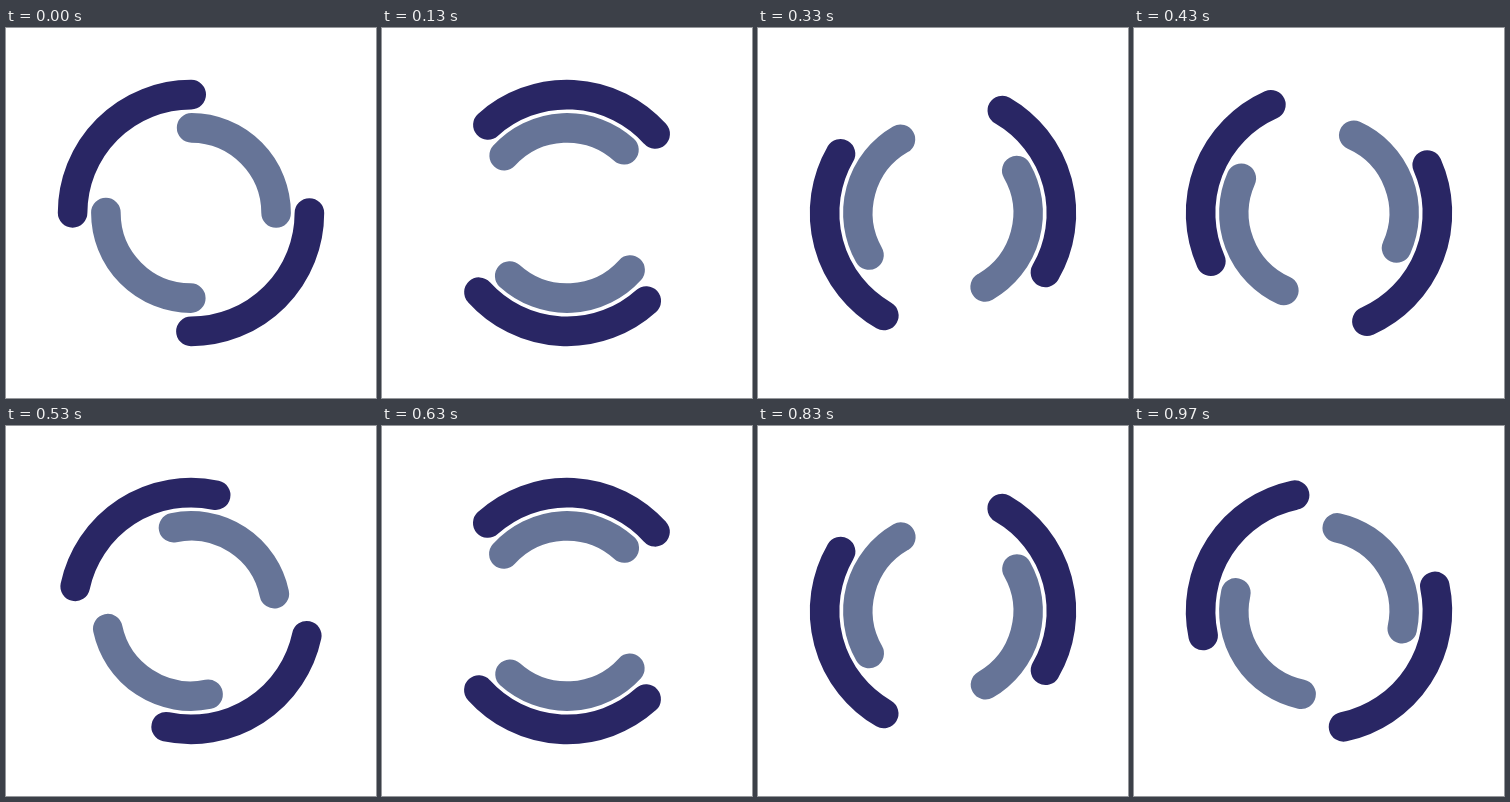
These frames come from a looping animation (370 px wide and 370 px high, 1 s). An HTML page:

```html
<!DOCTYPE html>
<html lang="en">
<head>
<meta charset="utf-8">
<title>Double ring loader</title>
<style>
  html, body { margin: 0; width: 100%; height: 100%; overflow: hidden; background: #fff; }
  svg { display: block; width: 100%; height: 100%; }
  circle { fill: none; stroke-width: 8; stroke-linecap: round; }
</style>
</head>
<body>
<svg viewBox="0 0 100 100">
  <circle id="outer" cx="50" cy="50" r="32" stroke="#292664" stroke-dasharray="50.265"/>
  <circle id="inner" cx="50" cy="50" r="23" stroke="#667497" stroke-dasharray="36.128" stroke-dashoffset="36.128"/>
</svg>
<script>
  const LOOP = 1000, STEPS = 30;
  const outer = document.getElementById('outer');
  const inner = document.getElementById('inner');

  const turn = (ring, deg) => ring.setAttribute('transform', `rotate(${deg} 50 50)`);

  // 30 steps per turn, with step times rounded to 10 ms
  function draw(ms) {
    const tick = Math.floor((ms % LOOP) / 10);
    const step = Math.floor((tick + 0.5) * STEPS / 100);
    const deg = step * 360 / STEPS;
    turn(outer, deg);
    turn(inner, -deg);
  }

  const start = performance.now();
  function frame() {
    draw(performance.now() - start);
    requestAnimationFrame(frame);
  }
  frame();
</script>
</body>
</html>
```
